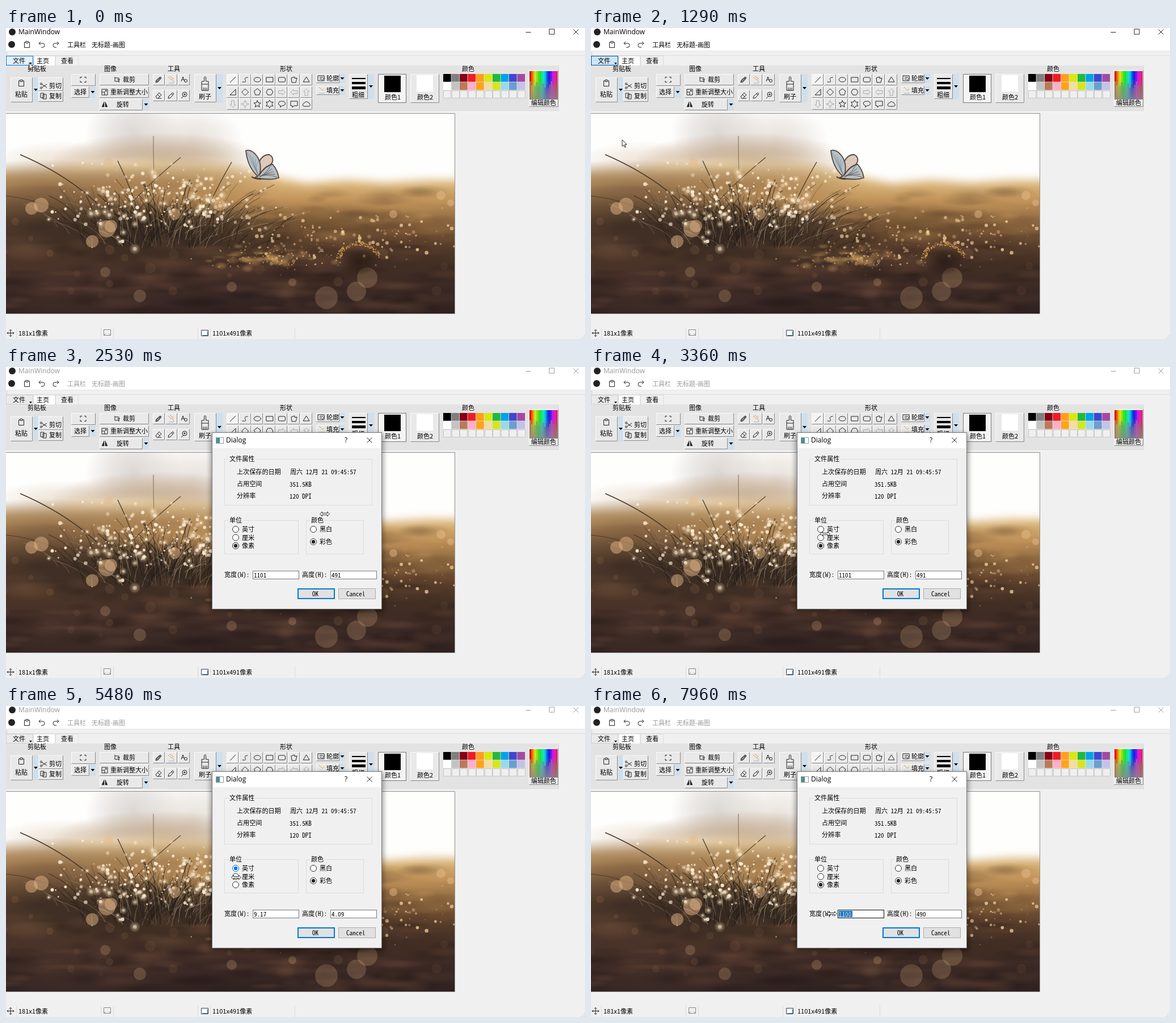
An HTML page with a canvas for the animation above (8000 ms loop, 1021 by 548 pixels).

```html
<!DOCTYPE html>
<html lang="zh">
<head>
<meta charset="utf-8">
<style>
html, body { margin: 0; width: 100%; height: 100%; overflow: hidden; background: #f0f0f0; }
canvas, svg { position: absolute; left: 0; top: 0; }
canvas { top: 151px; }
text { font: 11px 'Noto Sans CJK SC', 'Noto Sans CJK', 'Noto Sans', sans-serif; white-space: pre; }
.mono text { font: 11.1px 'Noto Sans Mono CJK SC', 'Noto Sans CJK SC', 'Noto Sans Mono', monospace; }
.mono .ui, .ui { font: 12px 'Open Sans', 'Noto Sans', sans-serif; }
</style>
</head>
<body>
<canvas id="photo" width="791" height="352"></canvas>
<svg id="stage" width="1021" height="548" viewBox="0 0 1021 548"></svg>
<script>
const $ = id => document.getElementById(id);

// ---- photo ----
let seed = 7;
const rnd = (a = 0, b = 1) => {
  seed = (seed * 16807) % 2147483647;
  return a + (b - a) * seed / 2147483647;
};
const bell = (mid, spread) => mid + spread * (rnd() + rnd() + rnd() - 1.5);

function paintPhoto() {
  const c = $('photo').getContext('2d');
  c.translate(0, -151);
  const blob = (x, y, rx, ry, rgb, alpha) => {
    c.save();
    c.translate(x, y);
    c.scale(rx, ry);
    const g = c.createRadialGradient(0, 0, 0, 0, 0, 1);
    g.addColorStop(0, `rgba(${rgb},${alpha})`);
    g.addColorStop(.5, `rgba(${rgb},${alpha * .6})`);
    g.addColorStop(1, `rgba(${rgb},0)`);
    c.fillStyle = g;
    c.fillRect(-1, -1, 2, 2);
    c.restore();
  };
  const dot = (x, y, r, color) => {
    c.fillStyle = color;
    c.beginPath();
    c.arc(x, y, r, 0, 7);
    c.fill();
  };
  const blade = (x, y, cx, cy, tx, ty, w, color) => {
    c.strokeStyle = color;
    c.lineWidth = w;
    c.beginPath();
    c.moveTo(x, y);
    c.quadraticCurveTo(cx, cy, tx, ty);
    c.stroke();
  };

  c.fillStyle = '#fefefd';
  c.fillRect(0, 151, 791, 352);
  blob(225, 185, 85, 75, '198,190,184', .6);
  blob(330, 200, 90, 65, '214,204,194', .6);
  blob(100, 235, 130, 35, '222,200,175', .5);
  blob(270, 232, 190, 48, '178,142,104', .7);

  const land = c.createLinearGradient(0, 240, 0, 503);
  ['#f0dcb4', '#dcb679', '#bd9057', '#916a40', '#69492f', '#503729', '#432e27', '#382724', '#2f2120']
    .forEach((s, i) => land.addColorStop(i / 8, s));
  c.filter = 'blur(8px)';
  c.fillStyle = land;
  c.beginPath();
  c.moveTo(-30, 530);
  [[-30, 252], [60, 250], [120, 240], [250, 232], [380, 238], [440, 255], [530, 274],
   [600, 268], [670, 273], [740, 268], [820, 268], [820, 530]].forEach(p => c.lineTo(...p));
  c.fill();
  c.filter = 'none';
  blob(80, 282, 250, 50, '126,90,60', .75);
  blob(300, 275, 190, 48, '150,110,68', .65);
  blob(60, 350, 260, 75, '58,42,35', .9);
  blob(290, 365, 270, 68, '44,35,30', .9);
  blob(560, 345, 150, 38, '92,66,40', .5);
  blob(660, 415, 230, 55, '58,41,32', .7);
  blob(40, 385, 55, 28, '100,74,55', .55);
  blob(130, 470, 220, 70, '78,54,45', .45);
  // mottled soil
  for (let i = 0; i < 150; i++)
    blob(rnd(0, 791), rnd(370, 500), rnd(20, 65), rnd(5, 15), i % 2 ? '30,20,20' : '120,82,60', rnd(.1, .32));
  for (let i = 0; i < 50; i++)
    blob(rnd(430, 791), rnd(285, 370), rnd(20, 55), rnd(6, 14), i % 2 ? '75,52,34' : '205,156,92', rnd(.1, .3));

  for (let i = 0; i < 40; i++)
    dot(rnd(0, 791), rnd(300, 480), rnd(4, 10), `rgba(205,150,102,${rnd(.03, .13)})`);

  for (let i = 0; i < 260; i++) {
    const x = bell(280, 150), y = rnd(335, 390), lean = (x - 265) * .3 + rnd(-35, 35), h = rnd(15, 75);
    blade(x, y, x + lean * .2, y - h * .6, x + lean, y - h, rnd(.5, 1.4),
      i % 3 ? `rgba(34,29,25,${rnd(.35, .85)})` : `rgba(190,166,132,${rnd(.25, .6)})`);
  }
  blade(205, 360, 145, 275, 25, 223, 1.4, '#44372a');
  blade(175, 370, 90, 305, 0, 296, 1.2, '#4a3a2a');
  blade(345, 350, 355, 310, 398, 236, 1.3, '#463829');
  blade(270, 350, 259, 285, 260, 190, 1, '#806d54');
  blade(240, 350, 225, 290, 197, 234, 1.3, '#41382b');
  blade(190, 350, 220, 300, 308, 228, 1.1, '#574630');
  blade(365, 370, 395, 310, 436, 292, 1.3, '#3a3026');
  blade(385, 375, 450, 350, 510, 335, 1, '#554128');

  // dew
  for (let i = 0; i < 300; i++) {
    const x = bell(270, 175), y = bell(305, 62), r = rnd(.6, 3.4);
    if (i % 4 === 0) blob(x, y, r * 3, r * 3, '255,226,184', .5);
    dot(x, y, r, `rgba(255,240,218,${rnd(.35, .95)})`);
  }
  for (let i = 0; i < 130; i++)
    dot(rnd(440, 790), bell(370, 50), rnd(.5, 3.4), `rgba(248,210,154,${rnd(.25, .8)})`);
  for (let i = 0; i < 45; i++)
    blob(bell(475, 95), bell(405, 18), rnd(6, 18), rnd(3, 8), '222,170,100', rnd(.15, .45));
  for (let i = 0; i < 110; i++)
    dot(bell(475, 110), bell(405, 22), rnd(.4, 1.6), `rgba(238,196,130,${rnd(.3, .8)})`);

  [[181, 237, 8], [178, 354, 15], [185, 349, 11], [152, 376, 11], [298, 328, 10], [45, 318, 11],
   [62, 312, 13], [377, 312, 10], [637, 440, 18], [565, 475, 20], [618, 464, 17], [767, 295, 8],
   [505, 448, 7], [398, 456, 9], [236, 472, 11], [175, 430, 9], [683, 328, 7], [784, 308, 6]]
    .forEach(([x, y, r]) => dot(x, y, r, `rgba(232,186,138,${y > 400 ? .22 : .48})`));

  // mossy arch
  blob(622, 412, 34, 24, '42,28,22', .95);
  for (let i = 0; i < 190; i++) {
    const a = rnd(3.2, 6.2), r = rnd(.82, 1.06);
    dot(622 + 37 * r * Math.cos(a), 407 + 29 * r * Math.sin(a), rnd(.4, 1.3), `rgba(225,172,85,${rnd(.4, .9)})`);
  }

  // butterfly
  const wing = (d, fill) => {
    const p = new Path2D(d);
    c.fillStyle = fill;
    c.fill(p);
    c.strokeStyle = '#58443c';
    c.lineWidth = 1.8;
    c.stroke(p);
  };
  wing('M444 242Q450 223 464 223Q472 227 470 236L463 246L447 262Z', '#dcc9bb');
  wing('M445 262Q426 246 423 216Q432 213 441 224Q451 236 448 255Z', '#b4c1cb');
  wing('M446 260Q456 243 470 240Q479 250 481 264Q468 269 438 264Z', '#b6bfc5');
  for (let i = 0; i < 5; i++) {
    blade(446, 261, 437, 245, 425 + i * 5, 219 + i * 4, .6, '#77777a');
    blade(447, 262, 460, 256, 466 + i * 3, 243 + i * 5, .9, '#665750');
  }
  blade(433, 262, 440, 267, 450, 266, 2, '#4d3a30');
}

// ---- drawing helpers ----
const rect = (x, y, w, h, fill, stroke = 'none', more = '') =>
  `<rect x="${x}" y="${y}" width="${w}" height="${h}" fill="${fill}" stroke="${stroke}" ${more}/>`;
const box = (x, y, w, h, fill, stroke, more) => rect(x + .5, y + .5, w - 1, h - 1, fill, stroke, more);
const text = (x, mid, s, more = '') => `<text x="${x}" y="${mid + 4}" ${more}>${s}</text>`;
const path = (d, x = 0, y = 0, stroke = '#222', fill = 'none', w = 1) =>
  `<path d="${d}" transform="translate(${x} ${y})" stroke="${stroke}" fill="${fill}" stroke-width="${w}"/>`;
const btn = (x, y, w, h, fill = '#e9e9e9') => rect(x, y, w, h, fill) +
  path(`M.5 ${h - .5}V.5H${w - .5}`, x, y, '#fafafa') + path(`M.5 ${h - .5}H${w - .5}V.5`, x, y, '#8b8b8b');
const drop = (x, y, w, h) => rect(x, y, w, h, '#cfdfec') +
  path('M-3.5-2H3.5L0 2Z', x + w / 2, y + h / 2, 'none', '#000');
// regular polygon, or a star when an inner radius is given
const ring = (n, r, inner) => {
  const count = inner ? 2 * n : n;
  return 'M' + Array.from({ length: count }, (_, i) => {
    const a = i * Math.PI * 2 / count - Math.PI / 2, q = inner && i % 2 ? inner : r;
    return (q * Math.cos(a)).toFixed(1) + ' ' + (q * Math.sin(a)).toFixed(1);
  }).join('L') + 'Z';
};
const oval = (rx, ry) => `M${-rx} 0A${rx} ${ry} 0 1 1 ${rx} 0A${rx} ${ry} 0 1 1 ${-rx} 0Z`;

const clip = 'M-2-4H-4.5V5.5H4.5V-4H2M-2-5.5H2V-2.5H-2Z';
const undo = 'M-2-5L-5-2L-2 1M-5-2H2Q5-2 5 1.5T2 5H-1';
const redo = 'M2-5L5-2L2 1M5-2H-2Q-5-2-5 1.5T-2 5H1';
const cross = 'M-4.5-4.5L4.5 4.5M4.5-4.5L-4.5 4.5';
const pencil = 'M-5 5L-4 1L3-5L5-3L-1 4ZM1-3L3-1';
const arrow = 'M-6-2.5H1V-5L6 0L1 5V2.5H-6Z';
const turn = (d, a, x, y, color) => `<g transform="translate(${x} ${y}) rotate(${a})">${path(d, 0, 0, color)}</g>`;
const disc = (x, y) => `<circle cx="${x}" cy="${y}" r="6" fill="#222"/>`;

// ---- main window ----
function frame() {
  return rect(0, 0, 1021, 40, '#fff') + rect(0, 40, 1021, 1, '#e6e6e6') + rect(0, 48, 1021, 1, '#dcdcdc') +
    rect(1, 43, 1, 1, '#888') + rect(1, 46, 1, 1, '#888') + disc(11, 7) + disc(10, 29) +
    path(clip, 37, 29) + path(undo, 63, 29) + path(redo, 88, 29) +
    `<g id="caption">${text(22, 7, 'MainWindow', 'class="ui"')}${text(108, 30, '工具栏')}${text(151, 30, '无标题-画图')}</g>` +
    `<g id="controls">${path('M-4.5 0H4.5', 921, 7.5)}${path('M-4.5-4.5H4.5V4.5H-4.5Z', 962.5, 6.5)}${path(cross, 1005, 7)}</g>` +
    box(48, 49, 39, 18, '#fff', '#e0e0e0') + box(87, 49, 41, 18, '#f0f0f0', '#dedede') +
    rect(0, 66, 977, 82, '#e3e3e3') + rect(0, 147, 977, 1, '#f8f8f8') + rect(976, 66, 1, 82, '#f8f8f8') +
    box(0, 49, 48, 17, '#e5f1fb', '#0078d7', 'id="file"') +
    text(12, 58, '文件') + text(54, 58, '主页') + text(97, 58, '查看') +
    path('M-2.5-1H2.5L0 2Z', 43.5, 62, 'none', '#000') +
    path('M0 150.5H791.5V503.5H0', 0, 0, '#8e8e8e');
}

function ribbon() {
  let s = text(38, 72, '剪贴板') + text(173, 72, '图像') + text(285, 72, '工具') + text(483, 72, '形状') + text(804, 72, '颜色');
  s += btn(8, 87, 39, 44) + path(clip, 27, 97) + text(16, 117, '粘贴') + drop(48, 87, 9, 44) +
    btn(57, 87, 44, 24) + path('M-4-3L5 3M-4 3L5-3', 67, 102) +
    path(oval(1.6, 1.6), 62, 98.5) + path(oval(1.6, 1.6), 62, 105.5) + text(76, 102, '剪切') +
    btn(57, 111, 44, 19) + path('M-5-5H1V3H-5ZM-1-3H5V5H-1Z', 66, 120) + text(76, 120, '复制');
  s += btn(115, 81, 43, 21) + path('M-5-2V-4.5H-2M2-4.5H5V-2M5 2V4.5H2M-2 4.5H-5V2', 136, 91) +
    btn(115, 103, 32, 20) + text(120, 113, '选择') + drop(148, 103, 10, 20) +
    btn(165, 81, 87, 20) + path('M-4-5V3H4M-4-3H3V5M0 0H5', 196, 91) + text(206, 91, '裁剪') +
    btn(165, 103, 87, 20) + path('M-5-5H5V5H-5ZM-5 0H0V5M0-1L3-3M1-3H3V-1', 174, 113) + text(184, 113, '重新调整大小') +
    btn(165, 125, 76, 20) + path('M-1-5V4H-5ZM1-5V4H5Z', 174, 135, '#222', '#222', .5) + text(195, 135, '旋转') + drop(242, 125, 10, 20);
  for (let i = 0; i < 6; i++) s += btn(259 + i % 3 * 22, i < 3 ? 81 : 109, 21, 20);
  s += path(pencil, 269, 91, '#222', '#888') + path('M-5-5L1 1L4-2L-2-6M3 1Q6 4 4 5', 291, 91, '#e0a03c') + path('M-4 6H5', 291, 91, '#8fb7db') +
    path('M-5 3L-2-5L1 3M-4 0H0', 314, 91) + path(oval(2.5, 2.5), 317, 93) +
    path('M-5 2L1-5L5-1L-1 5H-3ZM-2-2L2 2M-1 5H5', 269, 119) + path(pencil, 291, 119) +
    path(oval(4, 4), 315, 117) + path('M-2 3L-6 7M-2 0H2M0-2V2', 315, 117);
  s += btn(332, 81, 39, 50) + path('M-1.5-3V-10Q0-13 1.5-10V-3H6V2H-6V-3ZM-6 2V13H6V2M-3 8V13M0 8V13M3 8V13', 351, 97) +
    text(340, 121, '刷子') + drop(371, 81, 11, 50);

  const gray = '#aaa';
  const shapes = ['M-5 5L5-5', 'M-5 4C9 6-8-3 5-4', oval(6, 4), 'M-6-4H6V4H-6Z', 'M-4-4H4Q6-4 6-2V2Q6 4 4 4H-4Q-6 4-6 2V-2Q-6-4-4-4Z',
    'M-5-3L1-5L1-2L5-3L3 5H-4Z', 'M0-5L5.5 4H-5.5Z',
    'M5-5V5H-5Z', ring(4, 6), ring(5, 6), 'M-3-5H3L6 0L3 5H-3L-6 0Z', 0, 180, -90,
    90, ring(4, 7, 2.5), ring(5, 6.5, 2.8), ring(6, 7, 4), 'M-2 3Q-6 2-6-1Q-6-5 0-5T6-1Q6 3 0 3L-3 6Z',
    'M-6-5H6V3H0L-3 6V3H-6Z', 'M-4 4Q-8 3-6 0Q-5-2-3-2Q-1-6 3-3Q5-3 5-1Q9 3 4 4Z'];
  shapes.forEach((d, i) => {
    const c = i % 7, r = Math.floor(i / 7), x = 400 + 21.6 * c, y = [91, 113, 134][r];
    s += btn(389 + Math.round(21.6 * c), y - 10, 21, 20, i ? '#e9e9e9' : '#f4f4f4');
    s += typeof d === 'number' ? turn(arrow, d, x, y, gray) : path(d, x, y, i === 15 ? gray : '#222');
  });

  s += btn(547, 81, 41, 16) + path('M-6-5H5V4H-6ZM-3-2H3M-3 1H1M1 4L6-2', 556, 89) + text(565, 89, '轮廓') + drop(588, 81, 10, 16) +
    btn(547, 102, 41, 16) + path('M-5-5L1 1L4-2', 557, 109, '#e0a03c') + path('M-5 5H5', 557, 110, '#8fb7db') + text(565, 110, '填充') + drop(588, 102, 10, 16);
  s += btn(605, 81, 33, 44) + rect(610, 88, 24, 2, '#000') + rect(610, 95, 24, 4, '#000') + rect(610, 103, 24, 5, '#000') +
    text(610, 118, '粗细') + drop(638, 81, 11, 44);
  s += box(656, 81, 50, 51, '#f4f4f4', '#777') + rect(667, 84, 29, 29, '#000') + text(668, 122, '颜色1') +
    btn(713, 81, 51, 51) + rect(724, 83, 29, 29, '#fff') + text(725, 122, '颜色2');
  ('#000 #7f7f7f #880015 #ed1c24 #ff9f1c #d9e80f #22b93c #00a2e8 #3f48cc #a349a4 ' +
   '#fff #c3c3c3 #b97a57 #ffaec9 #ffa31a #f5dda0 #d5e61d #99d9ea #6a9fce #c3c3e7').split(' ').forEach((color, i) => {
    s += rect(771 + i % 10 * 14.5, i < 10 ? 81 : 95.5, 13.7, 13.7, color);
  });
  for (let i = 0; i < 10; i++) s += box(771 + Math.round(i * 14.5), 110, 14, 14, '#efefef', '#c8c8c8');

  s += btn(922, 74, 52, 65);
  for (let i = 0; i < 17; i++) {
    s += rect(923 + i * 2.9, 76, 3, 50, `hsl(${i * 21} 90% 47%)`);
    s += rect(923 + i * 2.9, 94 + i * 7 % 13, 3, 32 - i * 7 % 13, `hsl(${i * 21 + 25} 55% 50%)`);
  }
  return s + rect(923, 76, 50, 50, 'url(#fade)') + text(926, 132, '编辑颜色');
}

function status() {
  let s = path('M-6 0H6M0-6V6M-4-2L-6 0L-4 2M4-2L6 0L4 2M-2-4L0-6L2-4M-2 4L0 6L2 4', 8, 537.5) +
    text(22, 538, '181x1像素') + text(364, 538, '1101x491像素') +
    path('M-6-5H6V5H-6ZM-6 5L-3 2M6 5L3 2', 178.5, 536.5, '#888') +
    path('M-6-5H6V5H-6Z', 350.5, 537.5, '#345', '#fff') + path('M-4 4H5V-3', 350.5, 537.5, '#4a7fb5');
  [18, 167, 189, 338, 360, 509].forEach(x => s += rect(x, 528, 1, 20, '#dcdcdc'));
  return s + path('M1020 541v1M1017 544v1M1020 544v1M1014 547v1M1017 547v1M1020 547v1', 0, 0, '#aaa');
}

const menuItems = ['新建', '打开', '保存', '另存为', '打印', '属性', '关于', '退出'];
const menu = () => `<g id="menu">${box(0, 66, 150, 188, '#f2f2f2', '#a5a5a5')}` +
  rect(2, 184, 146, 23, '#91c9f7', 'none', 'id="hot"') +
  menuItems.map((s, i) => text(30, 79 + i * 23.3, s)).join('') + '</g>';

// ---- dialog ----
const radio = (id, x, y, label) => `<circle id="${id}" cx="${x}" cy="${y}" r="5.5" fill="#fff" stroke="#333"/>` +
  `<circle id="${id}dot" cx="${x}" cy="${y}" r="3.2" fill="#222"/>` + text(x + 11, y, label);
const group = (x, y, w, h, label) => box(x, y, w, h, 'none', '#dcdcdc') +
  rect(x + 7, y - 2, label.length * 11 + 4, 5, '#f0f0f0') + text(x + 9, y, label);

function dialog() {
  return `<g id="dialog" class="mono">${rect(360, 117, 306, 315, '#000', 'none', 'opacity=".35" filter="url(#soft)"')}` +
    box(363, 115, 300, 312, '#f0f0f0', '#777') + rect(364, 116, 298, 27, '#fff') +
    box(370, 124, 14, 11, '#fff', '#8a9aa5') + rect(371, 125, 6, 9, '#4d8f8c') +
    text(388, 129, 'Dialog', 'class="ui"') + text(597, 129, '?', 'class="ui"') + path(cross, 641, 129) +
    group(385, 162, 261, 82, '文件属性') +
    text(407, 185, '上次保存的日期') + text(501, 185, '周六 12月 21 09:45:57') +
    text(407, 206, '占用空间') + text(500, 207, '351.5KB') + text(407, 227, '分辨率') + text(500, 228, '120 DPI') +
    group(385, 270, 131, 60, '单位') + radio('inch', 405, 286, '英寸') + radio('cm', 405, 300.5, '厘米') + radio('px', 405, 315, '像素') +
    group(529, 270, 102, 60, '颜色') + radio('mono', 542, 286, '黑白') + radio('color', 542, 308, '彩色') +
    text(385, 366, '宽度(W):') + box(435, 359, 82, 15, '#fff', '#7a7a7a', 'id="edit"') +
    rect(437, 361, 24, 11, '#0078d7', 'none', 'id="mark"') + text(437, 367, '', 'id="wide"') +
    text(437, 367, '', 'id="lit" fill="#fff" clip-path="url(#marked)"') +
    text(522, 366, '高度(H):') + box(572, 359, 82, 15, '#fff', '#7a7a7a') + text(574, 367, '', 'id="high"') +
    rect(515, 391, 64, 17, '#e1e1e1', '#0078d7', 'stroke-width="2"') + text(540, 400, 'OK') +
    box(586, 390, 66, 19, '#e1e1e1', '#adadad') + text(600, 400, 'Cancel') + '</g>';
}

paintPhoto();
$('stage').innerHTML = `<defs><linearGradient id="fade" x2="0" y2="1"><stop offset=".25" stop-color="#888" stop-opacity="0"/>
  <stop offset="1" stop-color="#888" stop-opacity=".75"/></linearGradient>
  <filter id="soft"><feGaussianBlur stdDeviation="4"/></filter>
  <clipPath id="marked"><rect id="markClip" y="359" width="24" height="15"/></clipPath></defs>` +
  frame() + ribbon() + status() + menu() + dialog() +
  '<path id="cursor" fill="#fff" stroke="#111" stroke-width=".9"/>';

// ---- motion: start, end, from x y, to x y ----
const moves = [
  [270, 890, 41, 61, 55, 197],
  [1830, 2110, 56, 197, 200, 192],
  [2110, 2600, 200, 192, 583, 263],
  [2670, 3160, 588, 265, 405, 285],
  [3360, 3630, 413, 294, 411, 302],
  [3770, 3840, 410, 300, 410, 299],
  [3980, 4530, 410, 299, 405, 283],
  [4930, 5690, 405, 284, 407, 310],
  [5760, 5830, 408, 311, 408, 311],
  [5960, 6380, 408, 311, 444, 360],
  [6380, 6730, 444, 360, 452, 366],
  [6800, 7480, 452, 366, 463, 366],
  [7680, 7960, 463, 366, 425, 366]
];
const pointer = 'M0 0V11.5L2.6 9L4.6 13.4L6.4 12.6L4.5 8.3H8Z';
const sizer = 'M-8.5 0L-4.5-3.8V-1.4H4.5V-3.8L8.5 0L4.5 3.8V1.4H-4.5V3.8Z';

function cursorAt(t) {
  const m = moves.filter(m => m[0] <= t).pop();
  if (!m) return [41, 61];
  const [a, b, x0, y0, x1, y1] = m, n = Math.round((b - a) / 70);
  const p = Math.min(1, Math.floor((t - a) / 70 + .001) / n), e = p * p * (3 - 2 * p);
  return [Math.round(x0 + (x1 - x0) * e), Math.round(y0 + (y1 - y0) * e)];
}
const set = (id, attrs) => { for (const k in attrs) $(id).setAttribute(k, attrs[k]); };
const show = (id, on) => set(id, { visibility: on ? 'visible' : 'hidden' });

function draw(t) {
  const [x, y] = cursorAt(t), away = t >= 1360, focus = t >= 7080;
  set('cursor', { d: t > 2110 && x > 363 ? sizer : pointer, transform: `translate(${x} ${y})` });
  set('file', t < 1430 ? { fill: t < 270 ? '#e5f1fb' : '#cce4f7', stroke: t < 270 ? '#0078d7' : '#005499' }
    : { fill: '#eaeaea', stroke: '#d0d0d0' });
  set('caption', { fill: away ? '#999' : '#000' });
  set('controls', { opacity: away ? .45 : 1 });

  const row = Math.floor((y - 68) / 23.3);
  show('menu', t >= 340 && t < 1220);
  show('hot', t >= 340 && t < 1220 && row >= 0);
  set('hot', { y: 68 + Math.max(0, row) * 23.3 });
  set('dialog', { opacity: away ? Math.min(1, (Math.floor((t - 1360) / 70) + 1) / 3) : 0 });

  const unit = t < 3980 ? 'px' : t < 5070 ? 'cm' : t < 5960 ? 'inch' : 'px';
  const tint = t >= 3980 && !focus ? '#0078d7' : '#222';
  for (const id of ['inch', 'cm', 'px']) {
    set(id, { stroke: id === unit ? tint : '#333' });
    set(id + 'dot', { fill: tint, opacity: id === unit ? 1 : 0 });
  }
  set('monodot', { opacity: 0 });
  const [w, h] = t < 3980 ? ['1101', '491'] : { cm: ['23.30', '10.39'], inch: ['9.17', '4.09'], px: ['1100', '490'] }[unit];
  $('wide').textContent = $('lit').textContent = w;
  $('high').textContent = h;

  const left = Math.max(437, Math.min(461, 437 + Math.round((x - 437) / 6) * 6));
  const width = t >= 7680 ? 461 - left : 0;
  set('edit', { stroke: focus ? '#111' : '#7a7a7a' });
  set('mark', { x: left, width });
  set('markClip', { x: left, width });
}

(function tick() {
  draw(performance.now() % 8000);
  requestAnimationFrame(tick);
})();
</script>
</body>
</html>
```
